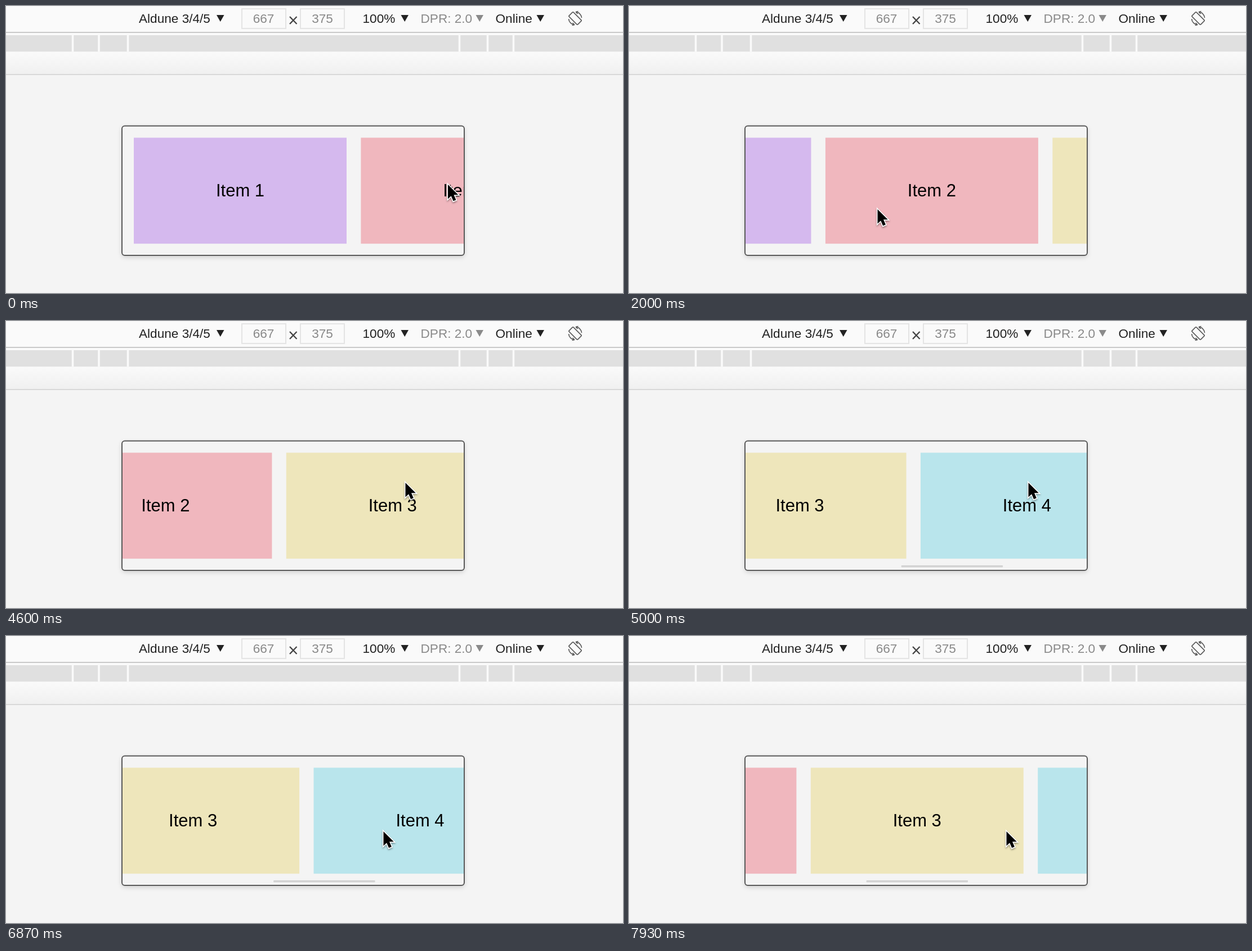
These frames come from a looping animation (1096x511 px, 8 s). An HTML page:

```html
<!DOCTYPE html>
<html lang="en">
<head>
<meta charset="utf-8">
<title>Carousel scroll</title>
<style>
  html, body { margin: 0; width: 100%; height: 100%; overflow: hidden; background: #f4f4f4; }
  svg { display: block; width: 1096px; height: 511px; font-family: "Liberation Sans", Arial, sans-serif; }
  #toolbar { font-size: 22.6px; fill: #222; }
  #toolbar .dim { fill: #8a8a8a; }
  #items text { font-size: 31px; text-anchor: middle; fill: #000; }
  #frame { fill: #f4f4f4; filter: drop-shadow(0 3px 4px rgba(0, 0, 0, .16)); }
  #pointer path { filter: drop-shadow(0 2px 1.5px rgba(0, 0, 0, .35)); }
</style>
</head>
<body>
<svg viewBox="0 0 1096 511">
  <defs>
    <linearGradient id="fade" x2="0" y2="1">
      <stop stop-color="#fafafa"/><stop offset="1" stop-color="#f0f0f0"/>
    </linearGradient>
    <clipPath id="view"><rect x="206" y="214" width="607.5" height="230" rx="5"/></clipPath>
    <path id="caret" d="M0 16h13.5L6.75 28z"/>
  </defs>

  <rect width="1096" height="82" fill="#fafafa"/>
  <rect y="46" width="1096" height="2" fill="#c9c9c9"/>
  <rect y="52" width="1096" height="29.5" fill="#e0e0e0"/>
  <path d="M118.5 52v29.5m46.5-29.5v29.5m51.5-29.5v29.5m589-29.5v29.5m50-29.5v29.5m46-29.5v29.5" stroke="#fafafa" stroke-width="3.5"/>
  <rect y="81.5" width="1096" height="40" fill="url(#fade)"/>
  <rect y="121.3" width="1096" height="1.4" fill="#cecece"/>

  <g id="toolbar">
    <text x="236" y="29.5">Aldune 3/4/5</text>
    <text x="633.5" y="29.5">100%</text>
    <text x="736.5" y="29.5" class="dim">DPR: 2.0</text>
    <text x="869.5" y="29.5">Online</text>
    <use href="#caret" x="374"/>
    <use href="#caret" x="701.5"/>
    <use href="#caret" x="834.5" class="dim"/>
    <use href="#caret" x="942.5"/>
    <g fill="none" stroke="#e4e4e4" stroke-width="2">
      <rect x="419" y="5" width="78" height="35"/><rect x="523" y="5" width="78" height="35"/>
    </g>
    <g class="dim" text-anchor="middle">
      <text x="457.5" y="29.5">667</text><text x="562" y="29.5">375</text>
    </g>
    <path d="M504 19l12.5 13m0-13L504 32" stroke="#444" stroke-width="2.3"/>
    <g transform="translate(1011 22)" fill="none" stroke="#5c5c5c" stroke-width="1.7">
      <rect x="-5.5" y="-11" width="11" height="22" rx="1.5" transform="rotate(-45)"/>
      <path id="turn" d="M1-11.5A11.5 11.5 0 0 1 11.5-1M1-11.5l4.5-1M1-11.5l3.5 3.5"/>
      <use href="#turn" transform="rotate(180)"/>
    </g>
  </g>

  <rect id="frame" x="206" y="213.5" width="608" height="230.5" rx="5"/>
  <g clip-path="url(#view)">
    <g id="items"></g>
    <rect id="bar" y="435" width="180.5" height="3.5" rx="1" fill="#d3d3d3"/>
  </g>
  <rect x="206" y="213.5" width="608" height="230.5" rx="5" fill="none" stroke="#5a5a5a" stroke-width="2"/>
  <g id="pointer">
    <path d="M0 0V25.5L5.7 20.2 9.6 29.3 14.4 27.3 10.5 18.3H18.3Z" stroke="#fff" stroke-width="3.2" paint-order="stroke"/>
  </g>
</svg>
<script>
const LOOP = 8000, PITCH = 403.4;
const $ = id => document.getElementById(id);
const clamp = v => Math.min(1, Math.max(0, v));
const smooth = u => u * u * (3 - 2 * u);
const glide = u => 1 - (1 - u) ** 4;

// start, end, scroll from, scroll to, easing
const scrolls = [
  [90, 870, 0, 281.5, glide],
  [2460, 3520, 281.5, 536, u => (1 - Math.exp(-3.8 * u)) / (1 - Math.exp(-3.8))],
  [4640, 5530, 535.5, 1022, u => 1 - (1 - u) ** 3],
  [6640, 7930, 1022, 711, Math.sqrt]
];

// time, x, y of the pointer tip
const pointerPath = [
  [930, 785, 318], [1730, 441.5, 362], [2030, 441.5, 362], [2440, 738.5, 303],
  [3530, 738.5, 303], [3900, 560, 362], [4330, 709.5, 288],
  [5760, 709.5, 288], [6150, 600, 388], [6530, 670.5, 348]
];

$('items').innerHTML = ['#d5b9ee', '#f0b7be', '#eee6bb', '#b9e5ec'].map((color, i) => {
  const x = 227 + i * PITCH;
  return `<rect x="${x}" y="234.5" width="378" height="188.7" fill="${color}"/>
    <text x="${x + 189}" y="339.3">Item ${i + 1}</text>`;
}).join('');

function scrollAt(t) {
  let left = 0, opacity = 0;
  for (const [start, end, from, to, ease] of scrolls) {
    if (t < start) break;
    left = from + (to - from) * ease(clamp((t - start) / (end - start)));
    opacity = clamp((t - start) / 60) * clamp(1 - (t - end - 140) / 160);
  }
  return { left, opacity };
}

function pointerAt(t) {
  const i = pointerPath.findIndex(p => p[0] > t);
  if (i < 1) return pointerPath.at(i).slice(1);
  const [t0, ...a] = pointerPath[i - 1], [t1, ...b] = pointerPath[i];
  const u = smooth((t - t0) / (t1 - t0));
  return a.map((v, k) => v + (b[k] - v) * u);
}

function draw(now) {
  const t = now % LOOP;
  const { left, opacity } = scrollAt(t);
  $('items').setAttribute('transform', `translate(${-left})`);
  $('bar').setAttribute('x', 209.7 + left * 0.298);
  $('bar').setAttribute('opacity', opacity);
  $('pointer').setAttribute('transform', `translate(${pointerAt(t)})`);
}

let begin;
function tick(now) {
  begin ??= now;
  draw(now - begin);
  requestAnimationFrame(tick);
}
draw(0);
requestAnimationFrame(tick);
</script>
</body>
</html>
```
